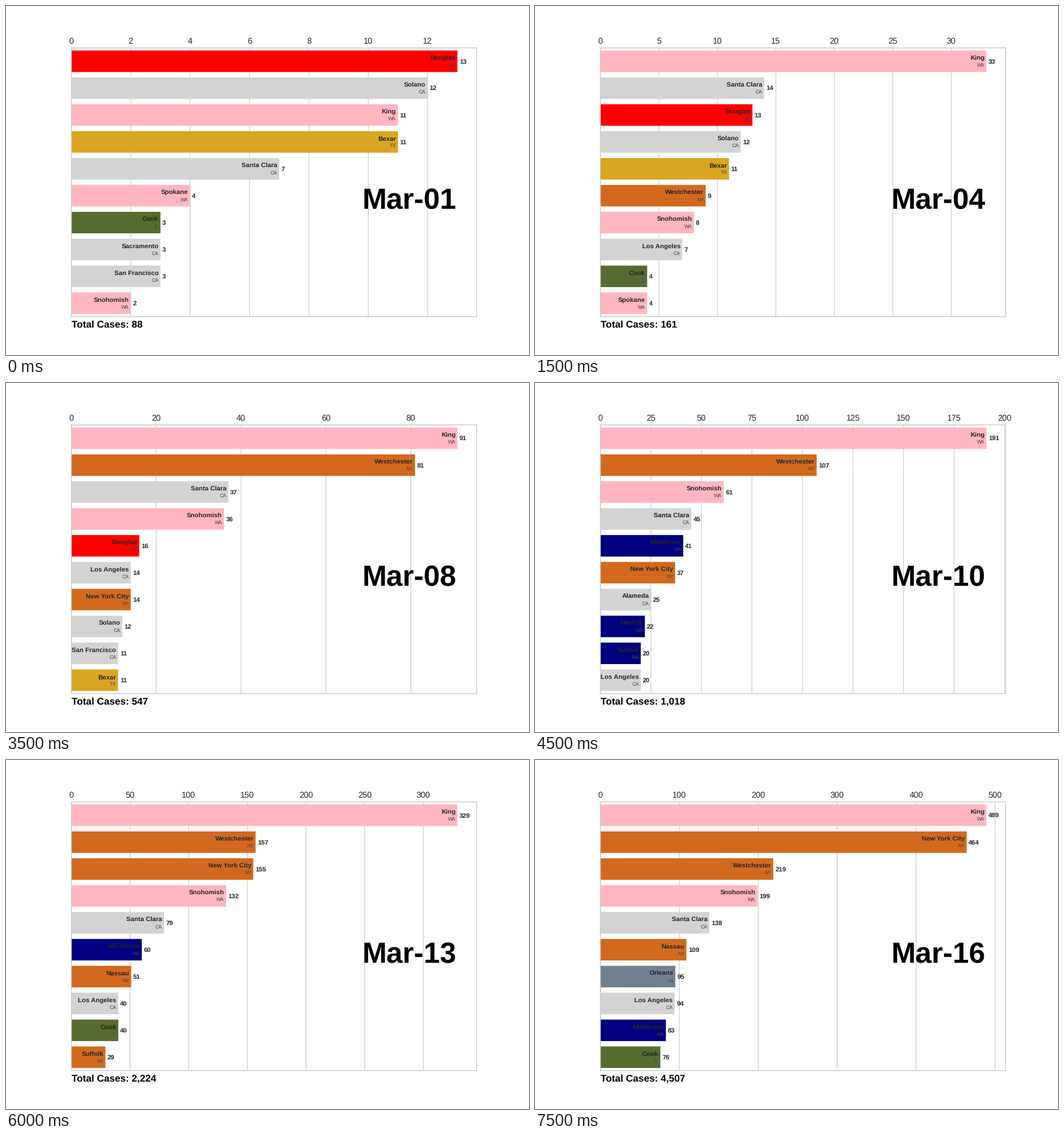
Write a matplotlib script that moves like this. It is 917x611 px and loops after 8 s.

```python
import numpy as np
import matplotlib.pyplot as plt
from matplotlib.animation import FuncAnimation
from matplotlib.ticker import MaxNLocator, StrMethodFormatter

W, H, DPI = 917, 611, 64
DAYS, STEP_MS, TOP = 16, 500, 10
KEY_DAYS = np.array([1, 4, 6, 8, 10, 13, 16])
INK, GRID = "#262626", "#cccccc"

STATE_COLORS = {
    "NE": "red", "CA": "lightgray", "WA": "lightpink", "TX": "goldenrod",
    "IL": "darkolivegreen", "NY": "chocolate", "MA": "navy", "LA": "slategray",
}


def px(size):
    """Pixels to points."""
    return size * 72 / DPI


def growth(values, since=1):
    """Daily counts, growing exponentially between key days."""
    days = KEY_DAYS[KEY_DAYS >= since][:len(values)]
    day = np.arange(1, DAYS + 1)
    curve = np.exp(np.interp(day, days, np.log(values)))
    return np.where(day < since, 0, np.rint(curve)).astype(int)


counties = []


def county(name, state, *values, since=1):
    counties.append((name, state, growth(values, since)))


# Ties keep this order; the last value holds.
county("King", "WA", 11, 33, 59, 91, 191, 329, 489)
county("Westchester", "NY", 9, 33, 81, 107, 157, 219, since=4)
county("Santa Clara", "CA", 7, 14, 24, 37, 45, 79, 138)
county("Suffolk", "MA", 20, since=10)
county("Los Angeles", "CA", 7, 13, 14, 20, 40, 94, since=4)
county("New York City", "NY", 5, 14, 37, 155, 464, since=6)
county("Solano", "CA", 12)
county("Nassau", "NY", 8, 19, 51, 109, since=8)
county("Orleans", "LA", 28, 95, since=13)
county("Middlesex", "MA", 8, 41, 60, 83, since=8)
county("Cook", "IL", 3, 4, 6, 8, 19, 40, 76)
county("Spokane", "WA", 4)
county("Snohomish", "WA", 2, 8, 18, 36, 61, 132, 199)
county("Douglas", "NE", 13, 13, 14, 16)
county("Sacramento", "CA", 3)
county("Harris", "TX", 5, since=6)
county("San Francisco", "CA", 3, 4, 5, 11, 14)
county("Bexar", "TX", 11)
county("Alameda", "CA", 25, since=10)
county("Norfolk", "MA", 22, since=10)
county("Suffolk", "NY", 29, 74, since=13)
totals = growth([88, 161, 311, 547, 1018, 2224, 4507])

plt.rcParams.update({"font.family": "Liberation Sans", "text.hinting": "none"})
fig = plt.figure(figsize=(W / DPI, H / DPI), dpi=DPI, facecolor="white")
ax = fig.add_axes([0.125, 0.11, 0.775, 0.77])


def style_axes(peak):
    ax.set_xlim(0, peak * 1.05)
    ax.set_ylim(-0.498, TOP - 0.502)
    ax.set_yticks([])
    ax.set_axisbelow(True)
    ax.xaxis.set_major_locator(MaxNLocator(9, steps=[1, 2, 2.5, 5, 10]))
    ax.xaxis.set_major_formatter(StrMethodFormatter("{x:,.0f}"))
    ax.xaxis.set_ticks_position("top")
    ax.tick_params(axis="x", length=0, pad=px(4.4),
                   labelsize=px(14.5), labelcolor=INK)
    ax.grid(axis="x", color=GRID, linewidth=px(1.2))
    for line in ax.get_xgridlines():
        line.set_snap(False)
    for spine in ax.spines.values():
        spine.set(color=GRID, linewidth=px(1.5), snap=False)


def draw(day):
    ax.clear()
    ranked = sorted(counties, key=lambda c: -c[2][day])[:TOP]
    peak = ranked[0][2][day]
    gap = peak / 200
    style_axes(peak)

    for rank, (name, state, cases) in enumerate(ranked):
        y, n = TOP - 1 - rank, cases[day]
        ax.barh(y, n, height=0.8, color=STATE_COLORS[state],
                linewidth=0, snap=False)
        ax.text(n - gap, y + 0.04, name, ha="right", color=INK,
                size=px(11.34), weight="bold")
        ax.text(n - gap, y - 0.2, state, ha="right", color="#444444",
                size=px(8.6))
        ax.text(n + gap, y - 0.077, f"{n:,}", color=INK,
                size=px(11.34), weight="bold")

    ax.text(0.95, 0.4, f"Mar-{day + 1:02d}", transform=ax.transAxes,
            ha="right", color="black", size=px(51.2), weight="bold")
    ax.text(0, -0.0405, f"Total Cases: {totals[day]:,}",
            transform=ax.transAxes, color="black", size=px(17.1),
            weight="bold")
    return []


anim = FuncAnimation(fig, draw, frames=DAYS, init_func=lambda: [],
                     interval=STEP_MS, repeat=True, repeat_delay=0)
plt.show()
```
